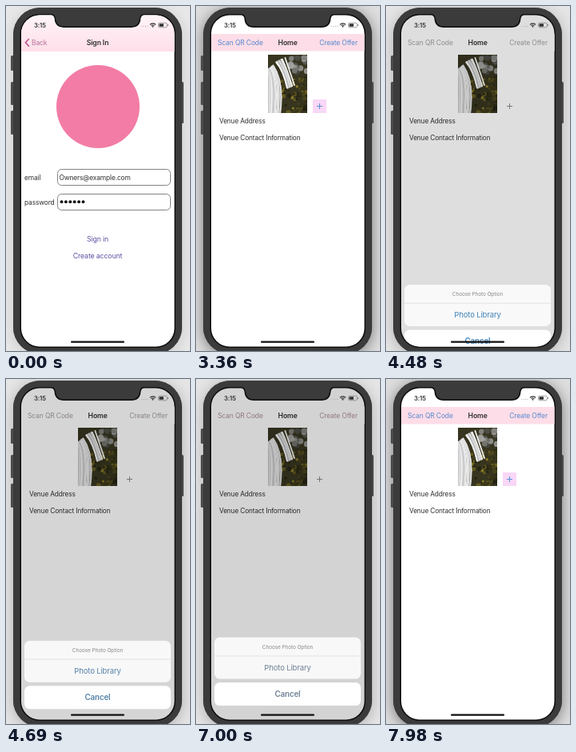
An HTML page with a canvas that plays this animation: 230 px wide and 432 px high, repeating every 8 s.

```html
<!DOCTYPE html>
<html lang="en">
<head>
<meta charset="utf-8">
<title>App sign in</title>
<style>
  html, body { margin: 0; width: 100%; height: 100%; overflow: hidden; background: #e4e4e4; }
  canvas { display: block; width: 230px; height: 432px; }
</style>
</head>
<body>
<canvas id="stage"></canvas>
<script>
const LOOP = 8000, W = 230, H = 432;
const HOME_AT = 1890, SHEET_IN = 4230, SHEET_OUT = 6998;
const INK = '#303030';
const canvas = document.getElementById('stage');
const ctx = canvas.getContext('2d');
const scale = window.devicePixelRatio || 1;
canvas.width = W * scale;
canvas.height = H * scale;

const clamp = v => Math.max(0, Math.min(1, v));
const ramp = (t, a, b) => clamp((t - a) / (b - a));
const mix = (a, b, k) => `rgb(${a.map((v, i) => Math.round(v + (b[i] - v) * k))})`;

// Critically damped spring from 0 to 1
function spring(ms) {
  const x = Math.max(0, ms) * 0.0108;
  return 1 - (1 + x) * Math.exp(-x);
}

function seeded(seed) {
  return () => (seed = (seed * 16807) % 2147483647) / 2147483647;
}

function roundPath(x, y, w, h, r) {
  ctx.beginPath();
  ctx.roundRect(x, y, w, h, r);
}

function box(x, y, w, h, r, fill) {
  roundPath(x, y, w, h, r);
  ctx.fillStyle = fill;
  ctx.fill();
}

function disc(x, y, r, fill) {
  ctx.beginPath();
  ctx.arc(x, y, r, 0, Math.PI * 2);
  ctx.fillStyle = fill;
  ctx.fill();
}

function line(points, color, width) {
  ctx.beginPath();
  points.forEach(([x, y], i) => i ? ctx.lineTo(x, y) : ctx.moveTo(x, y));
  ctx.strokeStyle = color;
  ctx.lineWidth = width;
  ctx.stroke();
}

function label(str, x, y, size, color, align = 'left', weight = 400) {
  ctx.font = `${weight} ${size}px Inter, "Liberation Sans", sans-serif`;
  ctx.letterSpacing = '-0.14px';
  ctx.textAlign = align;
  ctx.textBaseline = 'alphabetic';
  ctx.fillStyle = color;
  ctx.fillText(str, x, y);
}

function backdrop(shade) {
  ctx.fillStyle = mix([232, 232, 232], [222, 222, 222], shade);
  ctx.fillRect(0, 0, W, H);
  ctx.save();
  ctx.shadowColor = `rgba(0,0,0,${0.14 + 0.32 * shade})`;
  ctx.shadowBlur = 18 * scale;
  ctx.shadowOffsetY = 3 * scale;
  box(9, 2, 211, 434, 34, '#3b3b3b');
  ctx.restore();
}

function phoneBody() {
  for (const [y, h] of [[62, 19], [95, 29], [131, 30]]) box(6, y, 5, h, 1.5, '#4c4c4c');
  box(218, 95, 4, 52, 1.5, '#4c4c4c');
  box(9, 2, 211, 434, 34, '#3b3b3b');
}

// Display outline including the notch
function screenPath() {
  const l = 19, r = 210.5, top = 11.5, bottom = 426.5, c = 23;
  ctx.beginPath();
  ctx.moveTo(l + c, top);
  ctx.lineTo(56, top);
  ctx.quadraticCurveTo(60, top, 60.5, 16);
  ctx.quadraticCurveTo(61.5, 27, 72, 27);
  ctx.lineTo(157, 27);
  ctx.quadraticCurveTo(167.5, 27, 168.5, 16);
  ctx.quadraticCurveTo(169, top, 173, top);
  ctx.arcTo(r, top, r, bottom, c);
  ctx.arcTo(r, bottom, l, bottom, c);
  ctx.arcTo(l, bottom, l, top, c);
  ctx.arcTo(l, top, r, top, c);
  ctx.closePath();
}

function statusBar() {
  label('3:15', 35, 27, 7.7, INK, 'left', 600);
  for (let i = 0; i < 4; i++) disc(169.8 + i * 2.4, 25.3, 0.6, '#b5a4a8');
  ctx.strokeStyle = INK;
  ctx.lineWidth = 1.2;
  for (const r of [2.6, 4.8]) {
    ctx.beginPath();
    ctx.arc(183.5, 26.6, r, -Math.PI * 0.77, -Math.PI * 0.23);
    ctx.stroke();
  }
  disc(183.5, 25.8, 0.9, INK);
  roundPath(190.5, 21.2, 10.8, 5.6, 1.6);
  ctx.strokeStyle = '#777';
  ctx.lineWidth = 0.7;
  ctx.stroke();
  box(191.5, 22.2, 5.5, 3.6, 0.8, INK);
  box(202, 23, 0.9, 2, 0.4, '#777');
}

function field(name, y) {
  label(name, 23, y + 14, 8.4, INK);
  roundPath(64.5, y + 0.5, 141, 20, 5);
  ctx.strokeStyle = '#757575';
  ctx.lineWidth = 0.9;
  ctx.stroke();
}

function signIn(t) {
  const bar = ctx.createLinearGradient(0, 11, 0, 57);
  bar.addColorStop(0, '#fff6f9');
  bar.addColorStop(0.5, '#ffe9f0');
  bar.addColorStop(1, '#ffdfe9');
  ctx.fillStyle = bar;
  ctx.fillRect(18, 11, 194, 46);
  line([[28.8, 41], [24.4, 45.8], [28.8, 50.6]], '#bd5592', 1.6);
  label('Back', 32, 49, 8.5, '#b56f9a');
  label('Sign In', 114.5, 49, 8.7, INK, 'center', 600);

  disc(115, 126, 52, '#f27ca5');

  field('email', 204);
  field('password', 235);
  label('Owners@example.com', 66.5, 218, 8.4, INK);
  for (let i = 0; i < 6; i++) disc(69.5 + i * 5.4, 245.2, 1.9, '#111');

  const blink = ramp(t, 350, 420) - ramp(t, 910, 1050) + ramp(t, 1400, 1540);
  ctx.globalAlpha = blink;
  box(98.3, 239.5, 0.8, 11, 0.4, '#6873bd');
  ctx.globalAlpha = 1;

  label('Sign in', 114.5, 295, 8.75, '#5b4fa3', 'center');
  label('Create account', 114.5, 315.5, 8.75, '#5b4fa3', 'center');
}

function strand(x0, y0, cx, cy, x1, y1, color, width) {
  ctx.beginPath();
  ctx.moveTo(x0, y0);
  ctx.quadraticCurveTo(cx, cy, x1, y1);
  ctx.strokeStyle = color;
  ctx.lineWidth = width;
  ctx.stroke();
}

// Soft impression of a stream running over mossy rock
function photo() {
  const rand = seeded(41);
  const water = () => mix([150, 152, 154], [250, 250, 250], Math.sqrt(rand()));
  ctx.save();
  ctx.beginPath();
  ctx.rect(90, 61, 49, 73);
  ctx.clip();
  ctx.fillStyle = '#37351f';
  ctx.fillRect(90, 61, 49, 73);
  ctx.lineCap = 'round';
  ctx.filter = `blur(${0.5 * scale}px)`;
  for (let i = 0; i < 22; i++) {
    const tone = mix([70, 70, 64], [170, 170, 166], rand());
    disc(118 + 21 * rand(), 61 + 22 * rand(), 2 + 2 * rand(), tone);
  }
  for (let i = 0; i < 80; i++) {
    const tone = mix([34, 33, 18], [138, 124, 42], rand() ** 1.5);
    disc(106 + 33 * rand(), 90 + 44 * rand(), 1 + 2 * rand(), tone);
  }
  for (let i = 0; i < 24; i++) {
    const k = rand();
    strand(88 + 9 * k, 82 - 8 * k, 91 + 21 * k, 88 + 8 * k, 89 + 17 * k, 136, water(), 1 + 2 * rand());
  }
  for (let i = 0; i < 14; i++) {
    const k = rand();
    strand(99 + 16 * k, 63 + 8 * (1 - k), 108 + 11 * k, 80, 113 + 13 * k, 103 - 5 * k, water(), 1 + 1.5 * rand());
  }
  ctx.restore();
}

function home(t, open) {
  const gray = ramp(open, 0.52, 0.72);
  const dull = ramp(open, 0.35, 0.72);
  const settle = ramp(t, 4500, 5460);
  const muted = [165 + 10 * settle, 160 - 16 * settle, 162 - 8 * settle];
  ctx.fillStyle = mix([253, 221, 231], [255, 255, 255], gray);
  ctx.fillRect(18, 35, 194, 21.5);
  const tint = mix([88, 137, 208], muted, dull);
  label('Scan QR Code', 27, 49, 8.5, tint);
  label('Home', 114.7, 49, 8.7, INK, 'center', 600);
  label('Create Offer', 202, 49, 8.5, tint, 'right');

  photo();
  ctx.fillStyle = mix([249, 215, 247], [255, 255, 255], gray);
  ctx.fillRect(146, 117, 17, 17);
  const plus = mix([90, 145, 215], [140, 140, 140], dull);
  line([[151, 125.5], [158, 125.5]], plus, 1);
  line([[154.5, 122], [154.5, 129]], plus, 1);

  label('Venue Address', 29, 147, 8.3, INK);
  label('Venue Contact Information', 29, 167.5, 8.3, INK);

  ctx.fillStyle = `rgba(0,0,0,${0.173 * open})`;
  ctx.fillRect(18, 11, 194, 416);
}

function sheet(t, open) {
  if (open < 0.002) return;
  const y = 323.5 + 103 * (1 - open);
  const faded = ramp(t, 4500, 4970) * ramp(open, 0.6, 0.9);
  const tint = mix([66, 132, 184], [112, 130, 150], faded);
  box(23, y, 183, 52, 6.5, 'rgba(252,252,252,0.9)');
  line([[23, y + 23.3], [206, y + 23.3]], '#d9d9d9', 0.7);
  label('Choose Photo Option', 114.5, y + 14, 6.55, '#8c8c8c', 'center');
  label('Photo Library', 114.5, y + 41.3, 9.5, tint, 'center');
  box(23, y + 56.5, 183, 29, 6.5, '#fff');
  label('Cancel', 114.5, y + 74.5, 9.8, tint, 'center', 600);
}

function draw(t) {
  const open = t < SHEET_OUT ? spring(t - SHEET_IN) : 1 - spring(t - SHEET_OUT);
  ctx.setTransform(scale, 0, 0, scale, 0, 0);
  backdrop(ramp(t, 910, 1190) * (1 - 0.7 * ramp(open, 0.5, 0.75)));
  phoneBody();
  screenPath();
  ctx.strokeStyle = '#0c0c0c';
  ctx.lineWidth = 3;
  ctx.stroke();

  ctx.save();
  ctx.clip();
  ctx.fillStyle = '#fff';
  ctx.fillRect(18, 11, 194, 416);
  if (t < HOME_AT) {
    signIn(t);
  } else {
    home(t, open);
    sheet(t, open);
  }
  statusBar();
  box(81, 419.6, 67, 2.2, 1.1, '#111');
  ctx.restore();
}

const start = performance.now();
function tick() {
  draw((performance.now() - start) % LOOP);
  requestAnimationFrame(tick);
}
tick();
</script>
</body>
</html>
```
